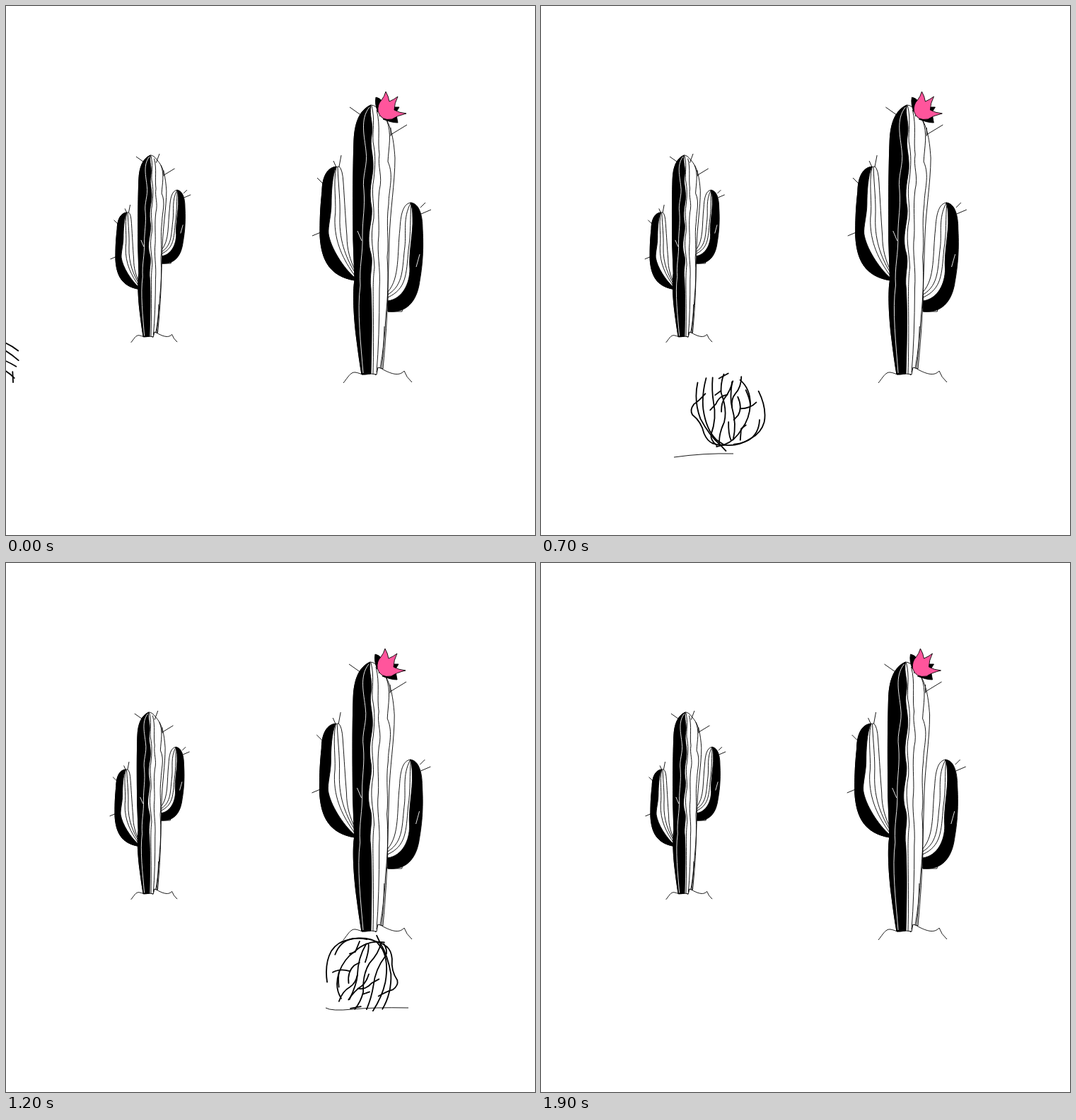
Animation, 748 px wide and 748 px high, one loop 2 s. Source, as an HTML page:

```html
<!DOCTYPE html>
<html lang="en">
<head>
<meta charset="utf-8">
<title>Tumbleweed</title>
<style>
  html, body { margin: 0; width: 100%; height: 100%; overflow: hidden; background: #fff; }
  svg { display: block; width: 100%; height: 100%; }
  path { fill: none; stroke: #000; stroke-width: .9; vector-effect: non-scaling-stroke; }
  .body { fill: #fff; }
  .dark { fill: #000; }
  .light { stroke: #fff; }
  .pink { fill: #ff559c; }
  #weed path { stroke-width: 1.8; stroke-linecap: round; stroke-linejoin: round; }
</style>
</head>
<body>
<svg viewBox="0 0 748 748">
  <defs>
    <g id="soil">
      <path d="M477 533C483 526 487 517 494 518S504 523 514 520Q519 517 523 522L526 510Q530 512 535 515C545 520 556 524 563 516Q566 525 574 532"/>
    </g>

    <g id="leftArm">
      <path class="body" d="M463 228C452 231 447 246 447 262C444 290 444 305 444 325C446 360 458 382 493 388L494 375C487 360 482 345 482 325C480 300 479 280 477 250Q476 231 471 227Z"/>
      <path class="dark" d="M467 227C452 229 447 246 447 262C444 290 444 305 444 325C446 360 458 382 493 388V384C477 370 459 342 456 322C455 312 460 295 460 280S461 240 467 227Z"/>
      <path d="M467 228C462 250 468 280 465 300C464 335 478 360 493 381M469 228C470 255 473 275 472 300C471 335 483 360 494 378"/>
      <path d="M463 219L467 228M474 211L471 227M440 243L448 251M433 325L445 320"/>
    </g>

    <g id="rightArm">
      <path class="body" d="M573 278C561 279 558 296 557 315C553 350 557 385 540 404V432H560L586 320Z"/>
      <path class="dark" d="M572 278C584 279 589 295 589 315C591 350 588 372 584 395C578 425 560 434 540 432V417C561 414 571 392 571 372C569 350 576 320 575 300Q575 285 572 278Z"/>
      <path d="M572 279C561 300 566 320 564 340C560 370 563 394 540 408M573 279C571 300 573 320 569 345C566 380 566 400 540 412"/>
      <path d="M593 278L586 285M601 288L587 294"/>
      <path class="light" d="M585 351L580 369"/>
    </g>

    <g id="trunk">
      <path class="body" d="M516 140C500 147 493 165 492 190C490 250 491 300 491 330L493 388C490 405 492 440 495 465Q500 505 503 521L516 520L524 521L526 511L533 513C537 470 539 440 540 400L542 330C543 290 550 250 550 215C548 185 544 165 530 150Q523 140 516 140Z"/>
      <path class="dark" d="M516 140C500 147 493 165 492 190C490 250 491 300 491 330L493 388C490 405 492 440 495 465Q500 505 503 521L516 520C517 480 518 440 516 400C513 380 520 365 516 350C508 325 519 305 517 285C512 260 518 245 519 230C520 210 514 200 517 183C520 165 513 155 516 140Z"/>
      <path class="light" d="M514 143C500 160 507 185 509 205C512 225 503 240 506 260C508 285 504 300 504 325C505 350 499 370 501 395C496 430 502 480 505 519M497 318L503 332"/>
      <path d="M517 141C522 160 518 178 519 192C523 212 522 225 520 245C516 265 521 280 520 300C514 330 520 345 521 370C517 400 521 430 519 520"/>
      <path d="M524 147C530 170 525 190 528 210C525 228 533 240 528 260C525 285 528 305 527 325C524 350 530 370 528 400Q528 470 524 518"/>
      <path d="M538 161C546 180 541 200 540 220C549 240 541 260 541 280C537 310 542 330 539 355C541 385 540 410 537 440Q535 480 529 512M535 453Q534 490 531 512M544 184V172"/>
      <path d="M486 143L503 155M535 137L528 156M567 168L544 182"/>
    </g>

    <g id="flower">
      <path class="dark" d="M523 129Q529 130 532 135L526 150Q521 139 523 129ZM547 143H556L551 151ZM533 160Q545 165 554 165L552 154Z"/>
      <path class="pink" d="M537 121Q541 128 542 135Q549 132 554 128Q549 138 549 147Q556 151 566 152Q553 155 546 160Q530 163 526 149Q525 139 531 133Q535 128 537 121Z"/>
    </g>
  </defs>

  <g transform="translate(-144.8 116.6) scale(.674)">
    <use href="#soil"/>
    <g id="smallCactus">
      <use href="#leftArm" y="33"/>
      <use href="#rightArm" y="-65"/>
      <use href="#trunk"/>
    </g>
  </g>

  <use href="#soil"/>
  <g id="bigCactus">
    <use href="#leftArm"/>
    <use href="#rightArm"/>
    <use href="#trunk"/>
    <use href="#flower"/>
  </g>

  <path id="firstGround" d="M188 638Q230 632 272 633"/>
  <path id="secondGround" d="M452 629Q460 634 490 631T569 629"/>

  <!-- The root of the weed points to the right at zero degrees. -->
  <g id="weed">
    <circle r="47" fill="#fff"/>
    <path d="M-36 -38Q-14 -53 6 -52Q22 -50 32 -36Q46 -20 46 0Q48 8 46 16"/>
    <path d="M4 -45Q24 -47 35 -33Q42 -22 43 -14"/>
    <path d="M-48 -10Q-38 -26 -16 -29Q4 -31 20 -22Q38 -15 46 0L50 10"/>
    <path d="M-36 49Q-10 51 14 38Q36 22 46 6L54 -4"/>
    <path d="M-44 38Q-20 41 0 36Q28 28 40 12L46 0"/>
    <path d="M-22 36Q-10 44 -5 50Q4 55 10 50Q18 36 34 30Q44 24 46 16"/>
    <path d="M-46 29Q-28 28 -12 23Q10 15 34 20Q42 20 48 10"/>
    <path d="M-53 14Q-40 17 -26 14Q-4 2 14 4Q34 10 47 6"/>
    <path d="M-55 8L-46 20M-29 15L-22 22M-25 5Q-22 16 -10 19L0 26"/>
    <path d="M-45 0Q-30 2 -20 8Q-12 12 0 10"/>
    <path d="M-44 1Q-20 1 -8 -4Q14 -14 37 -12"/>
    <path d="M-53 -11Q-38 -13 -28 -6Q-20 -1 -8 -4"/>
    <path d="M-20 -37Q-10 -30 -8 -16M-24 -10Q-10 -19 2 -14L9 -9"/>
    <path d="M-35 -20Q-24 -27 -16 -29M14 -27L20 -21L36 -22M13 -2Q30 -4 38 -9"/>
  </g>
</svg>

<script>
  const byId = id => document.getElementById(id);
  const LOOP = 2000, STEP = 100;

  const path = {
    x: [[0, -40], [400, 145], [700, 265], [900, 355], [1200, 504], [1600, 725], [1800, 796], [1900, 850], [2000, 900]],
    y: [[0, 508], [200, 515], [400, 537], [600, 570], [700, 575], [1200, 577], [1400, 550], [1600, 523], [1800, 508], [2000, 500]],
    turn: [[0, -146], [400, 0], [700, 98], [900, 172], [1200, 296], [1600, 445], [2000, 590]]
  };
  const firstReach = [[300, 0], [400, .12], [600, .5], [700, .5], [900, 0]];
  const secondReach = [[900, 0], [1100, .4], [1200, .5], [1300, .35], [1500, 0]];

  function at(keys, t) {
    if (t <= keys[0][0]) return keys[0][1];
    const i = keys.findIndex(key => key[0] >= t);
    if (i < 0) return keys[keys.length - 1][1];
    const [t0, v0] = keys[i - 1], [t1, v1] = keys[i];
    return v0 + (v1 - v0) * (t - t0) / (t1 - t0);
  }

  // Leans a cactus around its base; shift is the offset near the crown.
  function lean(id, shift) {
    const k = -shift / 378;
    byId(id).setAttribute("transform", `matrix(1 0 ${k} 1 ${-k * 521} 0)`);
  }

  // Shows a ground line from its middle outwards.
  function reveal(id, reach) {
    const line = byId(id), length = line.getTotalLength();
    line.style.visibility = reach > 0 ? "visible" : "hidden";
    line.style.strokeDasharray = `0 ${length * (.5 - reach)} ${length * 2 * reach} ${length}`;
  }

  function draw(now) {
    const t = Math.floor(now % LOOP / STEP) * STEP;
    const phase = t / LOOP * 2 * Math.PI;
    lean("smallCactus", 1.8 * Math.cos(phase));
    lean("bigCactus", 1.7 * Math.sin(phase));
    reveal("firstGround", at(firstReach, t));
    reveal("secondGround", at(secondReach, t));
    byId("weed").setAttribute("transform",
      `translate(${at(path.x, t)} ${at(path.y, t)}) rotate(${at(path.turn, t)})`);
  }

  const start = performance.now();
  function tick() {
    draw(performance.now() - start);
    requestAnimationFrame(tick);
  }
  tick();
</script>
</body>
</html>
```
